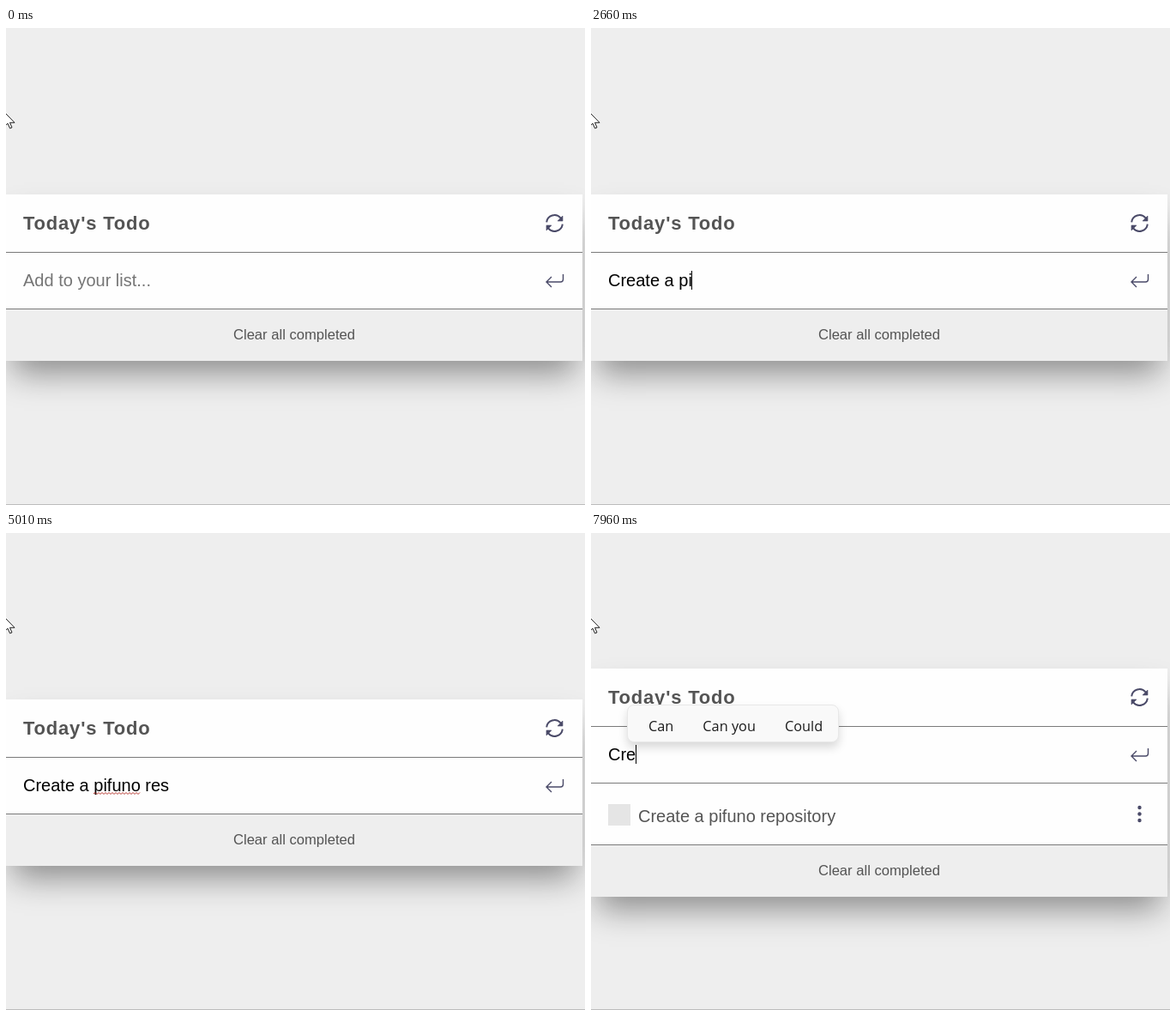
An HTML page for the animation above (8 s loop, 675 px wide and 556 px high).

```html
<!DOCTYPE html>
<html lang="en">
<head>
<meta charset="utf-8">
<title>Today's Todo</title>
<style>
  html, body { margin: 0; width: 100%; height: 100%; overflow: hidden; background: #eee; }
  body { font: 20px "Liberation Sans", Arial, sans-serif; color: #545454; }
  #stage { position: relative; width: 675px; height: 556px; overflow: hidden; background: #eee; }
  #stage::after { content: ""; position: absolute; left: 0; bottom: 0; width: 100%; height: 1px; background: #bdbdbd; }
  #card { position: absolute; left: 0; top: 194px; width: 672px; background: #fefefe;
    box-shadow: 0 22px 36px -8px rgba(0, 0, 0, .42); }
  #card.filled { top: 158px; }
  .row { position: relative; box-sizing: border-box; padding-left: 20px; border-bottom: 1px solid #7a7a7a; white-space: pre; }
  .title { height: 68px; line-height: 67px; font-size: 22px; font-weight: bold; letter-spacing: .8px; }
  .entry { height: 66px; line-height: 65px; color: #000; }
  .item { display: none; height: 72px; line-height: 76px; padding-left: 55px; }
  .filled .item { display: block; }
  .item i { position: absolute; left: 20px; top: 24px; width: 26px; height: 25px; background: #e5e5e5; }
  .clear { height: 60px; line-height: 59px; font-size: 16.6px; text-align: center; background: #eee; }
  .hint { color: #757575; position: absolute; left: 20px; top: 0; }
  #caret { position: absolute; top: 21px; width: 1px; height: 22px; margin-left: -.5px; background: #000; }
  svg { position: absolute; fill: none; stroke: #4a4a68; overflow: visible; }
  .icon { left: 629px; width: 21px; height: 21px; }
  #wave { left: 102px; top: 39px; stroke: #b5342c; }
  #popup { position: absolute; top: 43px; height: 44px; box-sizing: border-box; display: flex; gap: 34px;
    padding: 3px 0 0 24px; border: 1px solid #e8e8e8; border-radius: 8px; background: #f9f9f9;
    box-shadow: 0 6px 11px rgba(0, 0, 0, .15); color: #1b1b1b; white-space: pre;
    font: 16.3px/42px "Open Sans", "Noto Sans", sans-serif; }
  .filled #popup { top: 42px; }
</style>
</head>
<body>
<div id="stage">
  <div id="card">
    <div class="row title">Today's Todo<svg class="icon" style="top:23px" stroke-width="2">
      <path d="M1.2 9.3A9.3 9.3 0 0 1 17.6 4.4L19.5 6.6M19.8 11.7A9.3 9.3 0 0 1 3.4 16.6L1.5 14.4"/>
      <path d="M20 2v6h-6zM1 19v-6h6z" fill="#4a4a68" stroke-width=".6"/></svg></div>
    <div class="row entry"><span class="hint" id="hint">Add to your list...</span><span id="text"></span><i id="caret"></i>
<svg id="wave" width="55" height="5"><path id="zig"/></svg><svg class="icon" style="top:24px" stroke-width="1.4">
      <path d="M20.5 1v6q0 3-3 3H1M7 4L1 10l6 6"/></svg></div>
    <div class="row item"><i></i><span id="done"></span><svg class="icon" style="top:25px">
      <g fill="#4a4a68" stroke="none"><circle cx="10.5" cy="3" r="2.2"/><circle cx="10.5" cy="10.5" r="2.2"/><circle cx="10.5" cy="18" r="2.2"/></g></svg></div>
    <div class="clear">Clear all completed</div>
    <div id="popup"></div>
  </div>
  <svg style="left:-2px;top:98px" width="14" height="20">
    <path d="M0 0V17L4 13.2L6.6 19L9 18L6.5 12.3H12Z" fill="#fff" stroke="#222" stroke-width="1"/></svg>
</div>
<script>
const LOOP = 8000;
const base = "Create a ";
const task = base + "pifuno ";
const full = task + "repository";

// popup: left, right, words
const can = ["Can", "Can you", "Could"];
const early = [180, 402, ["read", "real", "really"]];

// time, typed text, popup, caret hidden
const steps = [
  [0, "", null, true],
  [390, ""],
  [920, "", null, true],
  [1120, "C"],
  [1320, "Cr", [35, 282, can]],
  [1410, "Cr"],
  [1500, "Cre", [52, 307, ["Crew", "Create", "Created"]]],
  [1580, "Crea"],
  [1780, "Creat", [68, 329, ["Crew", "Create", "Create a"]]],
  [1980, "Create"],
  [2080, "Create "],
  [2170, "Create a"],
  [2390, base],
  [2510, base + "p"],
  [2660, base + "pi"],
  [2730, base + "pi", [118, 344, ["pick", "pink", "piece"]]],
  [2790, base + "pif"],
  [2990, base + "pif", [124, 298, ["PiFuno", "gifted"]]],
  [3270, base + "pifu", [124, 298, ["PiFuno", "gifted"]]],
  [3460, base + "pifun", [146, 326, ["PiFuno", "pillow"]]],
  [3600, base + "pifuno"],
  [3660, base + "pifuno", [157, 322, ["PiFuno", "girth"]]],
  [3730, task],
  [3930, task + "r"],
  [4070, task + "re"],
  [4170, task + "re", early],
  [4470, task + "res", [190, 437, ["reset", "result", "results"]]],
  [4670, task + "res", [190, 601, ["restaurant", "responsible", "responsibilities"]]],
  [5010, task + "res", null, true],
  [5060, task + "re"],
  [5460, task + "rep", early],
  [5660, task + "repo"],
  [5790, task + "repo", [202, 478, ["report", "repeat", "reported"]]],
  [5920, task + "repos"],
  [6120, task + "reposi"],
  [6230, task + "reposit", [223, 526, ["deposit", "repository", "posited"]]],
  [6340, task + "reposito"],
  [6450, task + "repositor"],
  [6720, full, [252, 623, ["depository", "repository's", "repositories"]]],
  [6850, full],
  [6980, ""],
  [7500, "", null, true],
  [7640, "C"],
  [7830, "Cr", [42, 289, can]],
  [7960, "Cre", [42, 289, can]]
];
const ADDED = 6980;

const $ = id => document.getElementById(id);
const show = (el, on) => { el.style.display = on ? "" : "none"; };

$("done").textContent = full;
let zig = "M0 3";
for (let x = 2; x <= 54; x += 2) zig += `L${x} ${x % 4 ? 1.5 : 3.5}`;
$("zig").setAttribute("d", zig);

function draw([time, text, popup, hidden]) {
  $("card").className = time >= ADDED ? "filled" : "";
  $("text").textContent = text;
  show($("hint"), !text);
  show($("caret"), !hidden);
  show($("wave"), text.startsWith(task));
  show($("popup"), popup);
  if (!popup) return;
  const [left, right, words] = popup;
  $("popup").style.left = left + "px";
  $("popup").style.width = right - left + "px";
  $("popup").replaceChildren(...words.map(word => {
    const span = document.createElement("span");
    span.textContent = word;
    return span;
  }));
}

const start = performance.now();
let current;
function tick() {
  const t = Math.max(0, performance.now() - start) % LOOP;
  const step = steps.findLast(s => s[0] <= t);
  if (step !== current) draw(current = step);
  requestAnimationFrame(tick);
}
tick();
</script>
</body>
</html>
```
